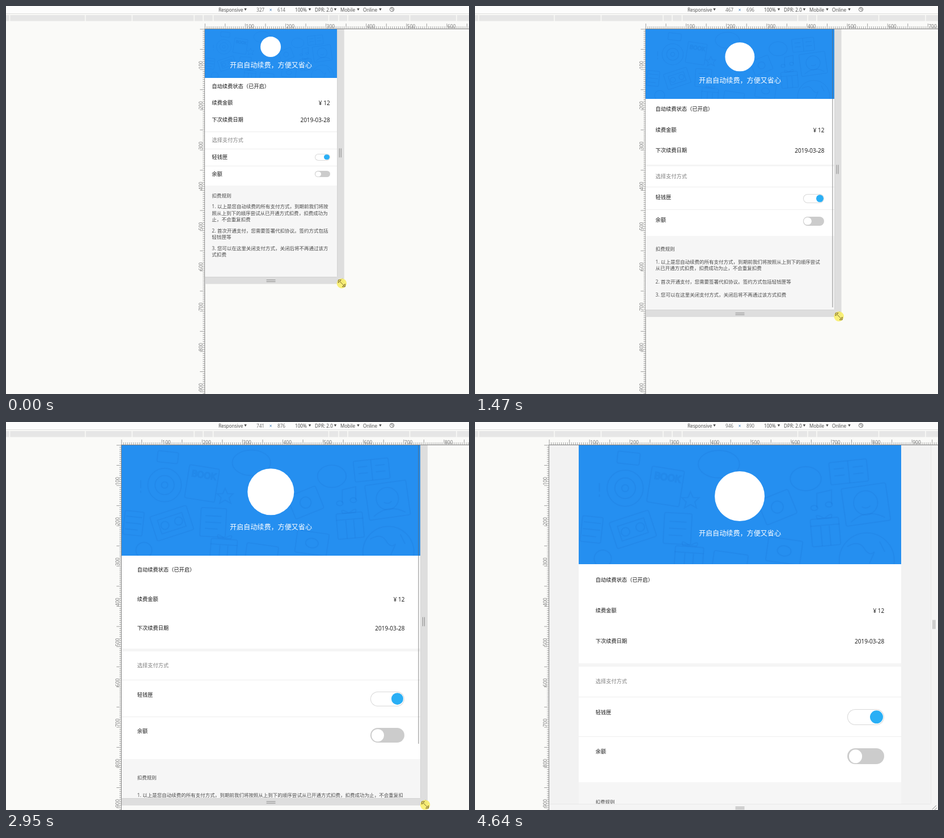
An HTML page that plays this animation: 817 by 685 pixels, repeating every 4870 ms.

```html
<!DOCTYPE html>
<html lang="zh-CN">
<head>
<meta charset="utf-8">
<title>Responsive preview</title>
<style>
html, body { margin: 0; width: 100%; height: 100%; overflow: hidden; }
body { position: relative; background: #fafaf8; font-family: "Open Sans", "Noto Sans CJK SC", "Noto Sans CJK", sans-serif; text-spacing-trim: space-all; }
svg { position: absolute; left: 0; top: 0; display: block; }
#chrome text { font-family: "Open Sans", sans-serif; }
#page { position: absolute; top: 41px; overflow: hidden; color: #141414; font-size: 9.24px; line-height: 12.85px; }
#content { position: relative; margin: 0 auto; }
.banner { position: relative; height: calc(138.5 * var(--u)); background: #258ff0; overflow: hidden; }
.banner svg { width: 100%; height: 100%; }
.mark { position: absolute; left: 50%; top: calc(64.8 * var(--u) - 8.8px); width: calc(58 * var(--u)); aspect-ratio: 1; border-radius: 50%; background: #fff; transform: translate(-50%, -50%); }
.title { position: absolute; width: 100%; top: calc(103 * var(--u)); text-align: center; white-space: nowrap; transform: translateY(-50%); font-size: 12.1px; line-height: 16px; color: #fff; }
.rows { background: #fff; padding: calc(.4 * var(--r)) 0 calc(7 * var(--r)); }
.pay { padding-top: 0; border-top: calc(4 * var(--r)) solid #f5f5f5; }
.row { display: flex; justify-content: space-between; align-items: flex-start; padding: calc(13.7 * var(--r)) calc(19.6 * var(--r)); white-space: nowrap; }
.row b { font: 10px/12.85px "Open Sans", sans-serif; }
.line { box-shadow: inset 0 -1px #eee; }
.muted { color: #808080; }
.switch { position: relative; box-sizing: border-box; width: calc(42.8 * var(--r)); height: calc(18.5 * var(--r)); border-radius: 99px; background: #ccc; }
.switch::after { content: ""; position: absolute; width: calc(15.4 * var(--r)); aspect-ratio: 1; top: 50%; left: calc(1.5 * var(--r)); border-radius: 50%; background: #fff; transform: translateY(-50%); }
.switch.on { background: #fff; box-shadow: inset 0 0 0 1px #d8d8d8; }
.switch.on::after { left: auto; right: calc(1.5 * var(--r)); background: #2aaff5; }
.rules { background: #f6f6f6; color: #4a4a4a; font-size: 8.53px; line-height: 11.4px; padding: calc(19.2 * var(--r)) calc(19.6 * var(--r) + .8px) calc(29 * var(--r)) calc(19.6 * var(--r)); }
.rules p { margin: 0; }
.rules p + p { margin-top: calc(13.5 * var(--r)); }
#thumb { position: absolute; top: 0; right: 1.5px; width: 2.5px; background: rgba(90, 90, 90, .36); }
</style>
</head>
<body>
<svg id="chrome" width="817" height="685">
  <rect width="817" height="13.5" fill="#fcfcfc"/>
  <rect y="13" width="817" height="1" fill="#dedede"/>
  <rect y="16" width="817" height="10.5" fill="#e6e6e6"/>
  <g id="breaks" fill="#fafaf8"></g>
  <g id="menu" font-size="8.2" fill="#444"></g>
  <g fill="none" stroke="#777"><circle cx="681" cy="6" r="3.7"/><path d="M678 3l6 6M680 2.5l4 4"/></g>
  <g id="rulerX" stroke="#888"></g>
  <g id="rulerY" stroke="#888"></g>
  <path id="bars"/>
  <g stroke="#888"><path id="gripX"/><path id="gripY"/><path id="gripXY"/></g>
</svg>

<div id="page">
  <div id="content">
    <div class="banner">
      <svg viewBox="0 0 375 138.5"><g id="doodles" fill="none" stroke="#0b4fb4" stroke-opacity=".09" stroke-width="1.4"></g></svg>
      <div class="mark"></div>
      <div class="title">开启自动续费，方便又省心</div>
    </div>
    <div class="rows">
      <div class="row">自动续费状态（已开启）</div>
      <div class="row">续费金额<b>¥ 12</b></div>
      <div class="row">下次续费日期<b>2019-03-28</b></div>
    </div>
    <div class="rows pay">
      <div class="row line muted">选择支付方式</div>
      <div class="row line">轻钱匣<i class="switch on"></i></div>
      <div class="row">余额<i class="switch"></i></div>
    </div>
    <div class="rules">
      <p>扣费规则</p>
      <p>1. 以上是您自动续费的所有支付方式，到期前我们将按照从上到下的顺序尝试从已开通方式扣费，扣费成功为止，不会重复扣费</p>
      <p>2. 首次开通支付，您需要签署代扣协议。签约方式包括轻钱匣等</p>
      <p>3. 您可以在这里关闭支付方式，关闭后将不再通过该方式扣费</p>
    </div>
  </div>
  <div id="thumb"></div>
</div>

<svg id="overlay" width="817" height="685" style="overflow:hidden">
  <g id="cursor">
    <circle r="8.7" fill="#f8ee66" fill-opacity=".88"/>
    <path d="M-4 -4L5 5M-6 -1V-6H-1L-6 -1M6 1V6H1L6 1" fill="none" stroke="#7d6a30"/>
  </g>
</svg>

<script>
const LOOP = 4870, START = 530, STEP = 77.5, LAST = 53;
const SCALE = .7112, CENTER = 467.5, TOP = 41, BAR = 13, MAX_WIDTH = 800;

// step, viewport width, viewport height
const KEYS = [
  [-1, 327, 614], [4, 349, 635], [6, 361, 645], [12, 467, 696], [13, 485, 706],
  [18, 543, 763], [20, 561, 782], [27, 690, 846], [31, 741, 876], [33, 764, 890],
  [34, 783, 890], [41, 879, 890], [43, 892, 890], [49, 935, 890], [LAST, 946, 890]
];

const $ = id => document.getElementById(id);
const set = (id, attrs) => Object.entries(attrs).forEach(([k, v]) => $(id).setAttribute(k, v));
const label = (x, y, text, more = '') => `<text x="${x}" y="${y}" ${more}>${text}</text>`;

function buildToolbar() {
  const offsets = [102, 119.5, 135.5, 245, 327.5];
  const xs = [6.5, ...offsets.flatMap(d => [CENTER - d, CENTER + d])];
  $('breaks').innerHTML = xs.map(x => `<rect x="${x - .75}" y="15" width="1.5" height="12"/>`).join('');

  const menus = [[375, 'Responsive', 422.5], [510, '100%', 536], [545, 'DPR: 2.0', 581], [590, 'Mobile', 621.5], [630, 'Online', 660.5]];
  $('menu').innerHTML = menus.map(([x, text, arrow]) =>
    label(x, 9.7, text) + `<path d="M${arrow - 2.2} 4.2h4.4l-2.2 4z"/>`).join('') +
    label(449, 9.7, '', 'id="width" text-anchor="middle" fill="#666"') +
    label(467, 9.7, '×', 'text-anchor="middle" fill="#2b6fb5"') +
    label(486, 9.7, '', 'id="height" text-anchor="middle" fill="#666"');
}

function buildRulers() {
  let ticksX = '', ticksY = '', textX = '', textY = '';
  const style = 'font-size="8.5" fill="#777" stroke="none"';
  for (let n = 0; n <= 1000; n += 5) {
    const p = n * SCALE, size = n % 50 ? 4 : 9;
    ticksX += `M${p} 40v${-size}`;
    ticksY += `M0 ${TOP + p}h${-size}`;
    if (n && n % 100 === 0) {
      textX += label(p + 1, 38.5, n, style);
      textY += label(0, 0, n, `${style} transform="translate(-4 ${TOP + p - .5}) rotate(-90)"`);
    }
  }
  $('rulerX').innerHTML = `<path d="${ticksX}" stroke-width=".8"/><path d="M0 40.5H817"/>${textX}`;
  $('rulerY').innerHTML = `<path d="${ticksY}" stroke-width=".8"/><path d="M-.5 40V685"/>${textY}`;
}

function buildDoodles() {
  const box = (x, y, w, h, turn = 0, inner = '') =>
    `<g transform="translate(${x} ${y}) rotate(${turn})"><rect x="${-w / 2}" y="${-h / 2}" width="${w}" height="${h}" rx="2"/>${inner}</g>`;
  const oval = (x, y, rx, ry = rx) => `<ellipse cx="${x}" cy="${y}" rx="${rx}" ry="${ry}"/>`;
  const gift = '<path d="M-17 -8H17M-5 -8V16M5 -8V16M0 -16q-12 -8 -8 0q8 0 8 0q12 -8 8 0z"/>';
  const lines = '<path d="M-10 -8H10M-10 0H10M-10 8H6"/>';
  $('doodles').innerHTML =
    oval(54, 50, 21) + oval(54, 50, 12) + oval(54, 50, 4) +
    box(101, 48, 38, 42, 9, '<text x="-15" y="-7" font-size="11">BOOK</text>') +
    box(63, 98, 48, 32, -18, oval(-9, 0, 5) + oval(9, 0, 5) + '<path d="M-16 -9H16V9H-16z"/>') +
    box(115, 97, 32, 36, 3, lines) + box(15, 98, 24, 30, 6, lines) +
    box(334, 69, 52, 44, -8, oval(0, -2, 14) + '<path d="M-20 18Q0 4 20 18M-5 2q5 4 10 0"/>') +
    box(287, 101, 33, 32, -5, gift) + box(128, 133, 33, 30, 4, gift) +
    box(314, 31, 44, 26, -6, '<path d="M0 -13V13M-17 -5H-5M5 -5H17M-17 3H-5M5 3H17"/>') +
    box(239, 123, 40, 28, 8, oval(0, 0, 8, 6)) + box(231, 72, 38, 30, -22, oval(0, 0, 7)) +
    box(176, 136, 40, 22, 8) + box(58, 15, 26, 14, 6) +
    oval(335, 134, 32) + '<path d="M312 118q14 -8 20 2t12 4l-6 14M350 112l6 12"/>' +
    oval(264, 39, 18, 14) + oval(163, 22, 24, 16) + oval(28, 132, 10) +
    '<path d="M277 73V56l17 -4v17M130 54l3 7h7l-5 5 2 7-7-4-7 4 2-7-5-5h7zM24 44v10m0 3v3"/>' +
    oval(274, 73, 4, 3) + oval(291, 69, 4, 3);
}

function sizeAt(step) {
  const i = Math.max(1, KEYS.findIndex(k => k[0] >= step));
  const a = KEYS[i - 1], b = KEYS[i], f = (step - a[0]) / (b[0] - a[0]);
  return [1, 2].map(c => Math.round(a[c] + (b[c] - a[c]) * f));
}

function draw(step) {
  const [w, h] = sizeAt(step);
  const width = w * SCALE, height = h * SCALE;
  const left = CENTER - width / 2, right = left + width, bottom = TOP + height;
  const wide = w > MAX_WIDTH, inner = Math.min(w, MAX_WIDTH) * SCALE;
  const unit = inner / 375;
  // page units trail the drag a little in its first half
  const rem = unit * (step >= 0 && step < 31 ? .985 : 1);

  $('width').textContent = w;
  $('height').textContent = h;
  set('rulerX', { transform: `translate(${left} 0)` });
  set('rulerY', { transform: `translate(${left} 0)` });

  const midY = TOP + height / 2;
  set('bars', {
    d: `M${right} ${TOP}h${BAR}V${bottom + BAR}H${left}V${bottom}H${right}z`,
    fill: step > 34 ? '#f4f4f4' : '#dedede'
  });
  set('gripX', { d: `M${right + 4.5} ${midY - 8}v16m3 0v-16` });
  set('gripY', { d: `M${CENTER - 8} ${bottom + 6}h16m0 3h-16` });
  set('gripXY', { d: `M${right + 3} ${bottom + 10}l7 -7m1 4l-4 4` });

  const page = $('page'), content = $('content'), thumb = $('thumb');
  page.style.cssText = `left:${left}px;width:${width}px;height:${height}px;background:${wide ? '#f2f2f2' : '#f6f6f6'};` +
    `box-shadow:0 0 2px rgba(0,0,0,.12);--u:${unit}px;--r:${rem}px`;
  content.style.width = inner + 'px';
  const full = content.offsetHeight;
  thumb.style.display = full > height && !wide ? 'block' : 'none';
  thumb.style.height = height * height / full + 'px';

  const drop = Math.max(0, step - 33) * 7;
  set('cursor', { transform: `translate(${right + 8.6} ${bottom + 12 + drop})` });
}

buildToolbar();
buildRulers();
buildDoodles();

const begin = performance.now();
let shown;
function tick() {
  const t = (performance.now() - begin) % LOOP;
  const step = t < START ? -1 : Math.min(LAST, Math.floor((t - START + 10) / STEP));
  if (step !== shown) draw(shown = step);
  requestAnimationFrame(tick);
}
tick();
</script>
</body>
</html>
```
